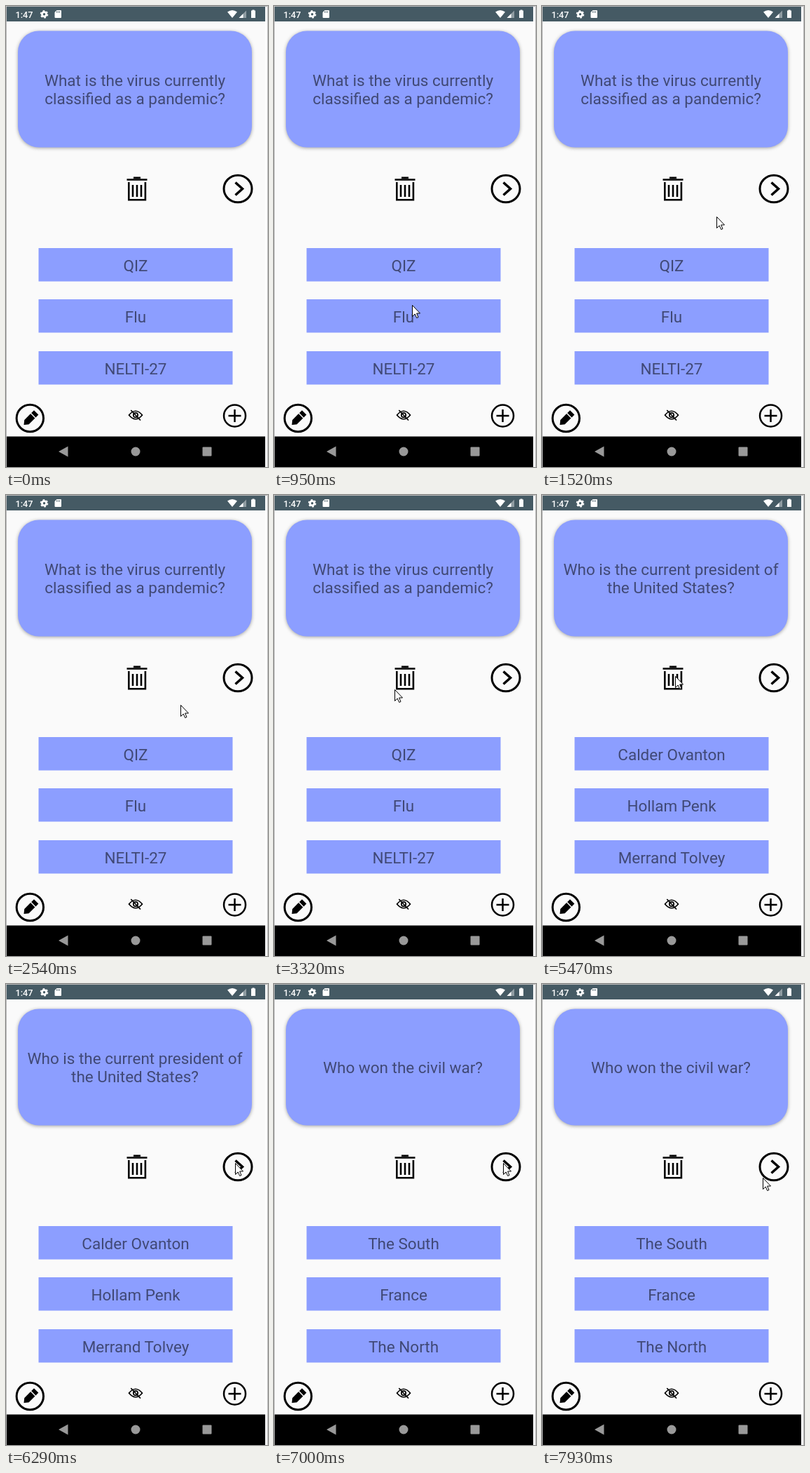
Write an HTML page that moves like this. It is 374x657 px and loops after 8 s.

```html
<!DOCTYPE html>
<html lang="en">
<head>
<meta charset="utf-8">
<title>Quiz cards</title>
<style>
  html, body { margin: 0; width: 100%; height: 100%; overflow: hidden; background: #fff; }
  svg { display: block; width: 374px; height: 657px; }
  text { font-family: Roboto, sans-serif; }
  .label { font-size: 22.5px; text-anchor: middle; fill: #000; fill-opacity: .54; }
  .line { fill: none; stroke: #000; }
  .fill { fill: #8c9eff; }
  .card { filter: drop-shadow(0 1px 2.5px rgba(0, 0, 0, .35)); }
</style>
</head>
<body>
<svg viewBox="0 0 374 657">
  <rect width="374" height="657" fill="#fff"/>
  <rect x="1" y="1" width="369" height="656" fill="#fafafa"/>
  <path d="M.5 657V.5H373.5V657" fill="none" stroke="#b8b8b8"/>

  <!-- Status bar -->
  <rect x="1" y="1" width="369" height="21" fill="#455a64"/>
  <g fill="#fff">
    <text x="13.5" y="16.6" font-size="12.6" font-weight="500">1:47</text>
    <circle cx="54.5" cy="11.8" r="3.1" fill="none" stroke="#fff" stroke-width="2.8"/>
    <circle cx="54.5" cy="11.8" r="5" fill="none" stroke="#fff" stroke-width="1.6" stroke-dasharray="2.6 2.636"/>
    <path d="M72.5 6H78Q79 6 79 7V16Q79 17 78 17H70.5Q69.5 17 69.5 16V9Z"/>
    <path d="M72.5 7.5V9.5M74.5 7.5V9.5M76.5 7.5V9.5" stroke="#455a64"/>
    <path d="M323 17L316 8.5Q323 3.5 330 8.5Z"/>
    <path d="M332.5 17L343 6.5V17Z" opacity=".4"/>
    <path d="M332.5 17L338.5 11V17Z"/>
    <path d="M351.5 6.5V5.5H354.5V6.5H356V17H350V6.5Z"/>
  </g>

  <!-- Question and answers -->
  <rect class="fill card" x="17" y="35.5" width="334" height="166" rx="30"/>
  <g id="question"></g>
  <g id="answers"></g>

  <!-- Bin -->
  <g class="line" stroke-width="2.6">
    <path d="M172.5 247.5H201.5M182 244.7H192"/>
    <path d="M175.3 251V276.2H198.9V251"/>
    <path d="M181 255V272M187 255V272M193 255V272"/>
  </g>

  <!-- Next -->
  <ellipse class="line" cx="331" cy="260.5" rx="20" ry="19.3" stroke-width="3"/>
  <path class="line" d="M327.5 251.5L337.5 260.5L327.5 269.5" stroke-width="3.5"/>

  <!-- Edit -->
  <circle class="line" cx="34.3" cy="587.5" r="19.2" stroke-width="3"/>
  <path d="M0 0L5.5 -4.5H18V4.5H5.5ZM19.5 -4.5H25V4.5H19.5Z" transform="translate(25.5 597) rotate(-45)"/>

  <!-- Hidden eye -->
  <g class="line" stroke-width="1.7">
    <path d="M175.5 583Q185 571.5 194.5 583Q185 594.5 175.5 583Z"/>
    <circle cx="185" cy="583" r="3.2"/>
    <path d="M178.3 576L192 590.5"/>
  </g>

  <!-- Add -->
  <circle class="line" cx="326.5" cy="584" r="15.5" stroke-width="2.5"/>
  <path class="line" d="M317.5 584H335.5M326.5 575V593" stroke-width="2.5"/>

  <!-- Navigation bar -->
  <rect x="1" y="613.5" width="369" height="43.5"/>
  <g fill="#999">
    <path d="M75 635L88.5 627.5V642.5Z"/>
    <circle cx="185" cy="635" r="6.5"/>
    <rect x="280.5" y="628.5" width="13" height="13" rx="1"/>
  </g>

  <path id="cursor" d="M.5 .5V16.5L4.2 13L6.7 18.5L9 17.5L6.6 12H11.5Z" fill="#fff" stroke="#000"/>
</svg>
<script>
const LOOP = 8000;
const TICK = 130; // the pointer is redrawn about this often

const cards = [
  { at: 0, question: ["What is the virus currently", "classified as a pandemic?"],
    answers: ["QIZ", "Flu", "NELTI-27"] },
  { at: 5470, question: ["Who is the current president of", "the United States?"],
    answers: ["Calder Ovanton", "Hollam Penk", "Merrand Tolvey"] },
  { at: 7000, question: ["Who won the civil war?"],
    answers: ["The South", "France", "The North"] },
];

// Turning points of the pointer
const path = [
  { at: 710, x: 42, y: 539 },
  { at: 950, x: 197, y: 426 },
  { at: 1100, x: 201, y: 423 },
  { at: 1250, x: 239, y: 333 },
  { at: 1520, x: 249, y: 300 },
  { at: 2540, x: 249, y: 299 },
  { at: 2780, x: 215, y: 244 },
  { at: 2930, x: 196, y: 234 },
  { at: 3320, x: 172, y: 277 },
  { at: 3560, x: 172, y: 273 },
  { at: 3830, x: 192, y: 262 },
  { at: 4100, x: 190, y: 258 },
  { at: 5750, x: 190, y: 258 },
  { at: 5990, x: 287, y: 243 },
  { at: 6140, x: 311, y: 243 },
  { at: 6290, x: 327, y: 255 },
  { at: 7800, x: 327, y: 255 },
  { at: 7930, x: 315, y: 276 },
];

const $ = id => document.getElementById(id);
const label = (x, y, text) => `<text class="label" x="${x}" y="${y}">${text}</text>`;

function drawCard({ question, answers }) {
  const top = 127 - 13 * (question.length - 1);
  $("question").innerHTML = question.map((s, i) => label(184, top + 26 * i, s)).join("");
  $("answers").innerHTML = answers.map((s, i) => {
    const y = 345 + Math.floor(73.7 * i);
    return `<rect class="fill" x="46.5" y="${y}" width="277" height="47.5"/>` +
      label(185, y + 32.5, s);
  }).join("");
}

// Moves in even jumps of about one tick between turning points
function pointerAt(t) {
  const i = path.findLastIndex(p => p.at <= t);
  const a = path[i], b = path[i + 1];
  if (!a || !b) return a;
  const span = b.at - a.at;
  const jumps = Math.round(span / TICK);
  const k = Math.floor((t - a.at) / span * jumps) / jumps;
  return { x: Math.round(a.x + (b.x - a.x) * k), y: Math.round(a.y + (b.y - a.y) * k) };
}

let shown;
function frame(now) {
  const t = now % LOOP;
  const card = cards.findLast(c => c.at <= t);
  if (card !== shown) drawCard(shown = card);

  const pointer = pointerAt(t);
  $("cursor").setAttribute("visibility", pointer ? "visible" : "hidden");
  if (pointer) $("cursor").setAttribute("transform", `translate(${pointer.x} ${pointer.y})`);
  requestAnimationFrame(frame);
}
frame(0);
</script>
</body>
</html>
```
